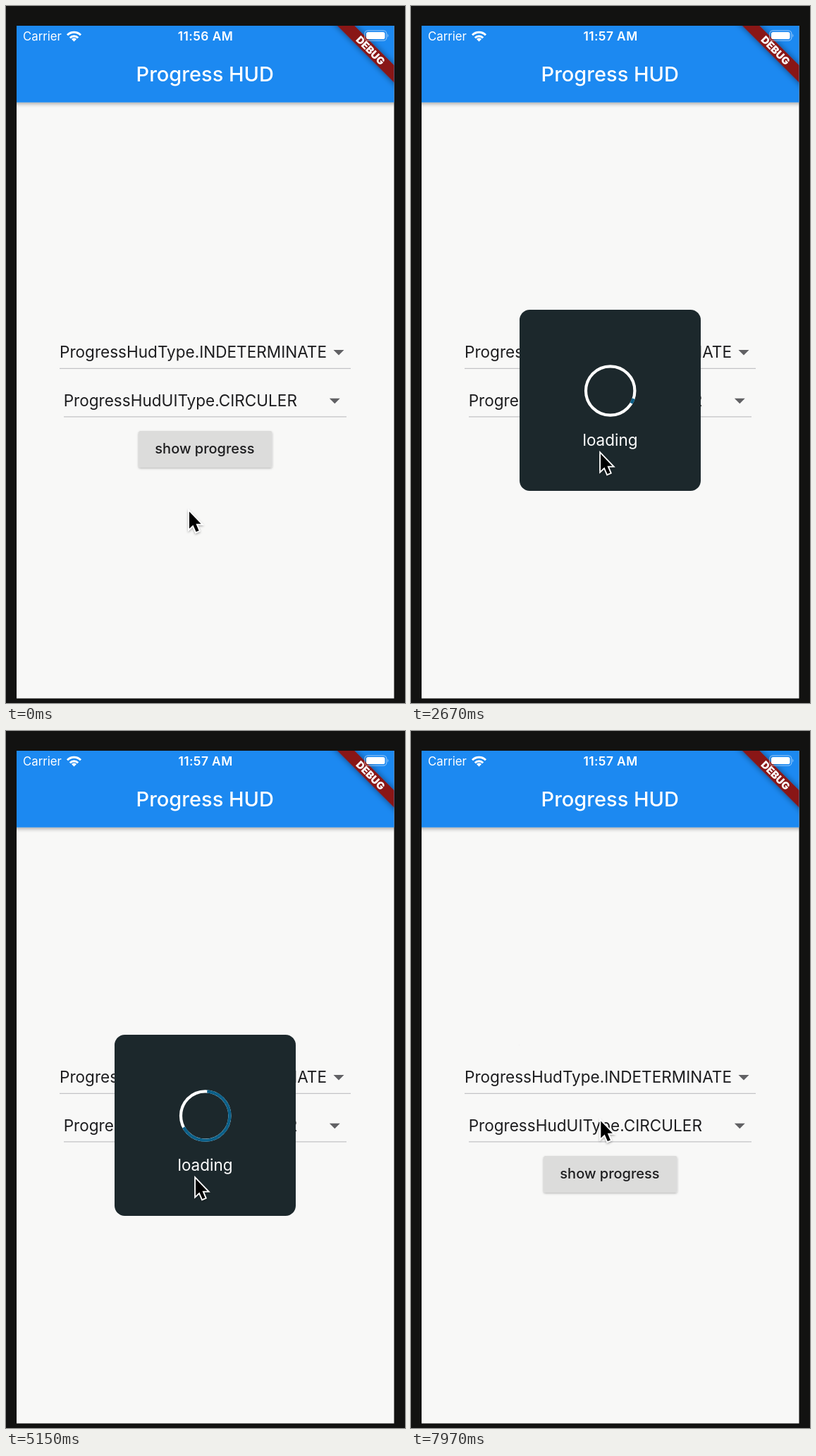
Write an HTML page that moves like this. It is 566 px wide and 989 px high and loops after 7990 ms.

```html
<!DOCTYPE html>
<html lang="en">
<head>
<meta charset="utf-8">
<title>Progress HUD</title>
<style>
  html, body { margin: 0; width: 100%; height: 100%; overflow: hidden; background: #121211; }
  svg { display: block; width: 100vw; height: 100vh; }
  text { font-family: Inter, "Open Sans", sans-serif; }
  .mid { text-anchor: middle; }
  .field { font-size: 22.57px; fill: #1d1d1f; }
</style>
</head>
<body>
<svg viewBox="0 0 566 989">
  <defs>
    <clipPath id="screen"><rect x="15" y="28" width="535.5" height="954.5"/></clipPath>
    <filter id="barShadow" x="-10%" y="-20%" width="120%" height="160%">
      <feDropShadow dx="0" dy="2.5" stdDeviation="2.5" flood-opacity=".3"/>
    </filter>
    <filter id="buttonShadow" x="-10%" y="-20%" width="120%" height="160%">
      <feDropShadow dx="0" dy="1.5" stdDeviation="1.5" flood-opacity=".28"/>
    </filter>
    <filter id="ribbonShadow" x="-20%" y="-100%" width="140%" height="300%">
      <feDropShadow dx="0" dy="0" stdDeviation="4.6" flood-opacity=".5"/>
    </filter>
    <filter id="cursorShadow" x="-50%" y="-30%" width="200%" height="180%">
      <feDropShadow dx="0" dy="1.5" stdDeviation="1.5" flood-opacity=".35"/>
    </filter>
  </defs>

  <rect width="566" height="989" fill="#121211"/>
  <g clip-path="url(#screen)">
    <rect x="14" y="28" width="538" height="956" fill="#f8f8f7"/>
    <rect x="4" y="18" width="558" height="118.7" fill="#1e89f1" filter="url(#barShadow)"/>

    <!-- status bar -->
    <g fill="#fff">
      <text x="24" y="49" font-size="16.8">Carrier</text>
      <text id="clock" class="mid" x="283" y="49" font-size="17.4" font-weight="600" letter-spacing=".4"></text>
      <g fill="none" stroke="#fff" stroke-width="3">
        <path d="M87 41.2 A13.4 13.4 0 0 1 106 41.2"/>
        <path d="M90.8 45.2 A8 8 0 0 1 102.2 45.2"/>
      </g>
      <path d="M96.5 50.5 L93 47 A5 5 0 0 1 100 47 Z"/>
    </g>
    <text class="mid" x="282.3" y="107" font-size="29" font-weight="500" fill="#fff">Progress HUD</text>

    <!-- debug ribbon -->
    <g transform="translate(551 28) rotate(45)">
      <rect x="-70" y="40" width="140" height="17.2" fill="#891419" filter="url(#ribbonShadow)"/>
      <text class="mid" x=".8" y="54" font-size="14.6" font-weight="900" fill="#fff">DEBUG</text>
    </g>
    <rect x="508.8" y="34.8" width="31" height="14.4" rx="4.5" fill="none" stroke="#fff" stroke-opacity=".45" stroke-width="1.3"/>
    <rect x="511" y="37" width="26.5" height="10" rx="2.6" fill="#fff"/>
    <path d="M541.3 39.5 q2.4 2.5 0 5 Z" fill="#fff" fill-opacity=".5"/>

    <!-- form -->
    <text class="field" x="76" y="499">ProgressHudType.INDETERMINATE</text>
    <text class="field" x="81.7" y="568">ProgressHudUIType.CIRCULER</text>
    <path d="M464.5 488 h15 l-7.5 7.5 Z M458.8 556.8 h15 l-7.5 7.5 Z" fill="#616164"/>
    <path d="M76 514.3 H489 M82 582.8 H483" stroke="#c3c3c6" stroke-width="1.2"/>
    <rect x="188" y="603" width="189.5" height="51.5" rx="2.5" fill="#dcdcdb" filter="url(#buttonShadow)"/>
    <text class="mid" x="282" y="635" font-size="20" font-weight="500" fill="#1d1d1f">show progress</text>

    <!-- loading panel -->
    <g id="hud">
      <rect x="154" y="431" width="257" height="257" rx="14.5" fill="#1c282c"/>
      <g fill="none" stroke-width="4.2">
        <circle cx="282.7" cy="546" r="34.7" stroke="#fff"/>
        <circle id="arc" cx="282.7" cy="546" r="34.7" stroke="#0b5f88" stroke-linecap="square" pathLength="360"/>
      </g>
      <text class="mid" x="282.5" y="623.5" font-size="22.5" fill="#fff">loading</text>
    </g>
  </g>

  <g id="cursor" filter="url(#cursorShadow)">
    <path d="M0 0 V24 L5.4 18.9 L9.6 28.6 L13.6 26.9 L9.5 17.3 H16.6 Z" fill="#000" stroke="#fff" stroke-width="3.6" paint-order="stroke"/>
  </g>
</svg>
<script>
const LOOP = 7990, CLOCK_TICK = 1250, HUD_ON = 1350, HUD_OFF = 5500;
const SPIN_PERIOD = 3590;
// [time, x, y] of the pointer tip
const pointer = [
  [0, 260, 717.5], [420, 266, 651.3], [990, 266, 651.3], [1250, 269, 635.5],
  [5990, 269, 635.5], [6730, 274.5, 618.5], [7500, 274, 602], [7970, 269.3, 553.5]
];
const $ = id => document.getElementById(id);
const clamp = v => Math.min(1, Math.max(0, v));

// cubic-bezier(.4, 0, .2, 1)
function fastOutSlowIn(x) {
  let lo = 0, hi = 1;
  for (let i = 0; i < 20; i++) {
    const s = (lo + hi) / 2, r = 1 - s;
    if (1.2 * r * r * s + .6 * r * s * s + s ** 3 < x) lo = s; else hi = s;
  }
  return lo * lo * (3 - 2 * lo);
}

function pointerAt(t) {
  const i = Math.max(1, pointer.findIndex(p => p[0] > t));
  const [a, b] = t >= pointer.at(-1)[0] ? pointer.slice(-2) : [pointer[i - 1], pointer[i]];
  const k = clamp((t - a[0]) / (b[0] - a[0])), e = k * k * (3 - 2 * k);
  return [a[1] + (b[1] - a[1]) * e, a[2] + (b[2] - a[2]) * e];
}

function drawSpinner(t) {
  const turns = 3.628 + (t - 1650) / SPIN_PERIOD;
  const step = Math.floor(turns), phase = turns - step;
  const head = 270 * fastOutSlowIn(clamp(phase * 2));
  const tail = 270 * fastOutSlowIn(clamp(phase * 2 - 1));
  const start = tail + 306 * phase - 144 * step - 90;
  $("arc").setAttribute("stroke-dasharray", `${Math.max(head - tail, .1)} 360`);
  $("arc").setAttribute("transform", `rotate(${start} 282.7 546)`);
}

function render(now) {
  const t = now % LOOP;
  $("clock").textContent = t < CLOCK_TICK ? "11:56 AM" : "11:57 AM";
  $("hud").style.display = t >= HUD_ON && t < HUD_OFF ? "" : "none";
  drawSpinner(t);
  $("cursor").setAttribute("transform", `translate(${pointerAt(t)})`);
}

const began = performance.now();
function tick() {
  render(performance.now() - began);
  requestAnimationFrame(tick);
}
tick();
</script>
</body>
</html>
```
